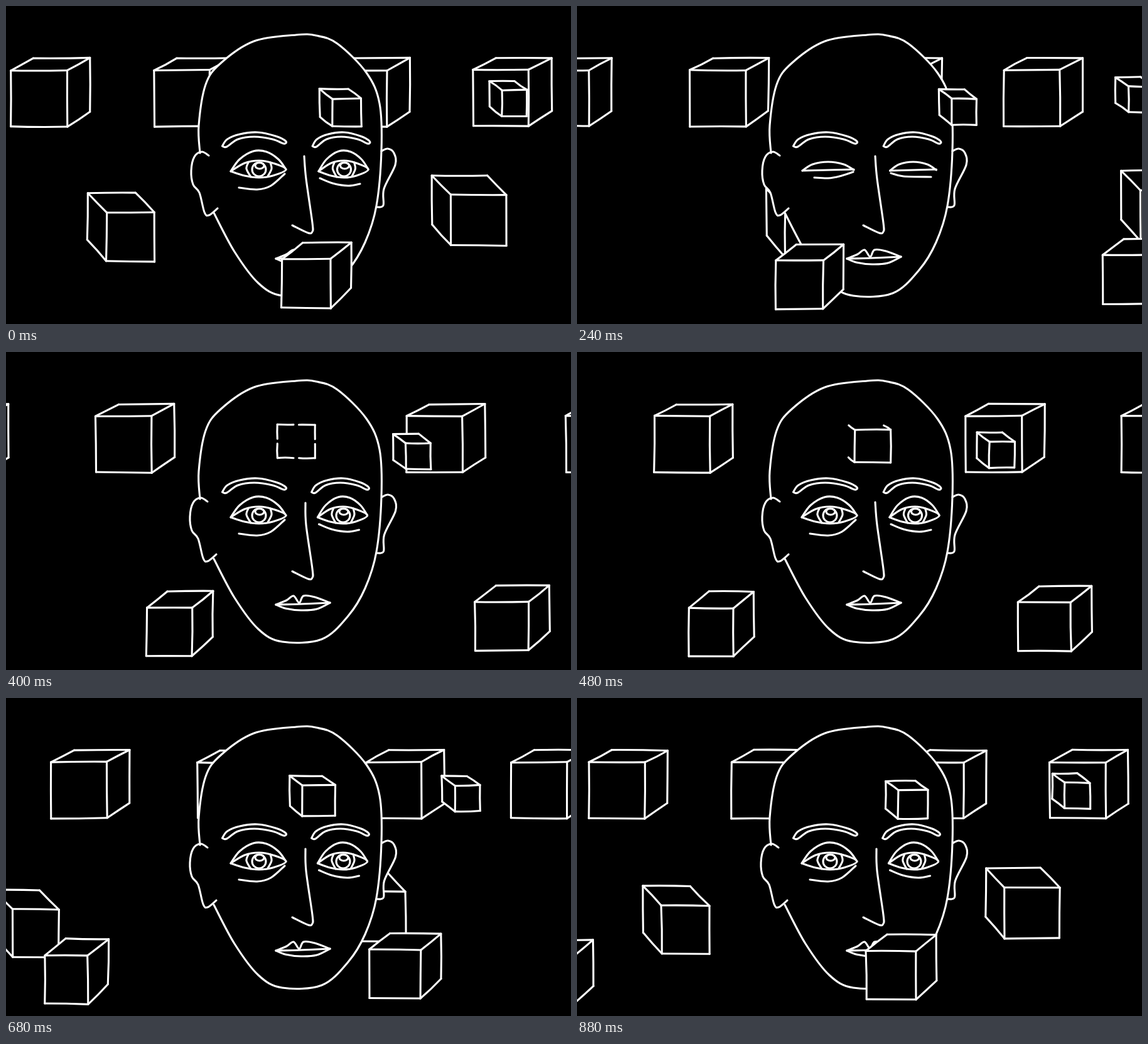
Recreate the animation shown at these times as an HTML page with a canvas. Size 900 by 506 pixels, loop 920 ms.

```html
<!DOCTYPE html>
<html lang="en">
<head>
<meta charset="utf-8">
<title>Cubes and head</title>
<style>
  html, body { margin: 0; width: 100%; height: 100%; overflow: hidden; background: #000; }
  canvas { display: block; width: 900px; height: 506px; }
</style>
</head>
<body>
<canvas id="stage" width="900" height="506"></canvas>
<script>
const LOOP = 920, STEP = 40;
const ctx = document.getElementById('stage').getContext('2d');
const clamp = (v, lo = 0, hi = 1) => Math.max(lo, Math.min(hi, v));

// A row follows one cube from entry to exit over several loops:
// path holds time, x pairs; shape gives the rest of the cube at a time.
const TOP = {
  path: [[280, 928], [400, 892], [760, 780], [920, 744], [1320, 638], [1840, 518], [2080, 456],
    [2600, 278], [2760, 236], [3160, 143], [3520, 52], [3680, 8], [4200, -160]],
  shape: () => ({ y: 102, w: 89, h: 89.5, dx: 36, dy: -19, low: -24 })
};
const MIDDLE = {
  path: [[480, -112], [760, 59], [920, 160], [1160, 332], [1480, 480], [1680, 599], [1840, 709], [2160, 960]],
  shape: t => ({ y: 340 - (t - 560) / 32, w: 72 + (t - 560) / 80, h: 76 + (t - 560) / 250, dx: -30, dy: -31, low: -34 })
};
const BOTTOM = {
  path: [[120, 905], [560, 657], [760, 526], [920, 439], [1040, 368], [1160, 317], [1680, 15], [1920, -160]],
  shape: t => ({ y: 394 + t / 105, w: 88 - (t - 240) / 70, h: 77.5, dx: 33, dy: -26, low: -31 })
};
// Starts as a square on the forehead, then grows depth and drifts off.
const SMALL = {
  path: [[280, 433], [400, 433], [560, 451], [760, 486], [920, 520], [1040, 565], [1160, 597],
    [1480, 677], [1840, 790], [2200, 922]],
  shape: t => {
    const depth = clamp((t - 400) / 160);
    const drop = 32 * (1 - clamp((t - 400) / 600)) ** 2;
    return {
      y: 148 - drop - Math.max(0, t - 1200) / 45,
      w: clamp(59 - (t - 400) / 40, 40, 59),
      h: clamp(53 - (t - 400) / 60, 41, 53),
      dx: -20 * depth, dy: -15 * depth, low: -15 * depth,
      front: (t - 280) / 280, back: (t - 560) / 160
    };
  }
};

function xAt(path, time) {
  const i = path.findIndex(key => key[0] > time);
  if (i < 1) return null;
  const [t0, x0] = path[i - 1], [t1, x1] = path[i];
  return x0 + (x1 - x0) * (time - t0) / (t1 - t0);
}

function wobble(seed, size = 0.8) {
  const v = Math.sin(seed * 127.1 + 3.7) * 43758.5453;
  return ((v - Math.floor(v)) * 2 - 1) * size;
}

function line(a, b, seed) {
  ctx.beginPath();
  ctx.moveTo(a[0], a[1]);
  ctx.quadraticCurveTo((a[0] + b[0]) / 2 + wobble(seed, 1.2), (a[1] + b[1]) / 2 + wobble(seed + 1, 1.2), b[0], b[1]);
  ctx.stroke();
}

// Draws an edge inward from both ends; a part of 0.5 closes it.
function edge(a, b, part, seed) {
  if (part <= 0) return;
  if (part >= 0.5) return line(a, b, seed);
  const mix = k => [a[0] + (b[0] - a[0]) * k, a[1] + (b[1] - a[1]) * k];
  line(a, mix(part), seed);
  line(mix(1 - part), b, seed + 2);
}

function cube(x, { y, w, h, dx, dy, low, front = 1, back = 1 }, seed) {
  const jig = (px, py, n) => [px + wobble(seed + n), py + wobble(seed + n + 0.5)];
  const f = [jig(x, y, 1), jig(x + w, y, 2), jig(x + w, y + h, 3), jig(x, y + h, 4)];
  const b = [jig(x + dx, y + dy, 5), jig(x + w + dx, y + dy, 6),
    jig(x + w + dx, y + h + low, 7), jig(x + dx, y + h + low, 8)];
  const [i, j, k, rest] = dx > 0 ? [0, 1, 2, 3] : [1, 0, 3, 2];
  if (back >= 0.5) {
    ctx.beginPath();
    [f[rest], f[i], b[i], b[j], b[k], f[k]].forEach(p => ctx.lineTo(p[0], p[1]));
    ctx.fill();
  }
  for (let n = 0; n < 4; n++) edge(f[n], f[(n + 1) % 4], front, seed + 10 + n * 3);
  if (!dx) return;
  [i, j, k].forEach(n => line(f[n], b[n], seed + 30 + n));
  edge(b[i], b[j], back, seed + 40);
  edge(b[j], b[k], back, seed + 44);
}

function row({ path, shape }, t) {
  const end = path[path.length - 1][0];
  for (let time = t; time < end; time += LOOP) {
    const x = xAt(path, time);
    if (x !== null) cube(x, shape(time), time / STEP * 7.3 + path.length);
  }
}

// Smooth curve through flat x, y pairs, moved and scaled along x.
function curve(pts, ox = 0, sx = 1, fill = false) {
  const n = pts.length / 2;
  const p = i => {
    const c = clamp(i, 0, n - 1);
    return [pts[c * 2] * sx + ox, pts[c * 2 + 1]];
  };
  ctx.beginPath();
  ctx.moveTo(...p(0));
  for (let i = 0; i < n - 1; i++) {
    const [a, b, c, d] = [p(i - 1), p(i), p(i + 1), p(i + 2)];
    ctx.bezierCurveTo(b[0] + (c[0] - a[0]) / 6, b[1] + (c[1] - a[1]) / 6,
      c[0] - (d[0] - b[0]) / 6, c[1] - (d[1] - b[1]) / 6, c[0], c[1]);
  }
  if (fill) ctx.fill();
  else ctx.stroke();
}

function ring(x, y, rx, ry = rx) {
  ctx.beginPath();
  ctx.ellipse(x, y, rx, ry, 0, 0, Math.PI * 2);
  ctx.stroke();
}

const SKULL = [
  309, 234, 307, 190, 318, 125, 342, 91, 395, 56, 462, 46, 494, 47, 528, 60, 574, 106, 595, 155,
  598, 230, 590, 318, 572, 376, 545, 420, 503, 457, 440, 461, 402, 441, 364, 391, 331, 329
];
const LEFT_EAR = [323, 238, 312, 232, 300, 240, 295, 262, 298, 284, 308, 297, 316, 328, 323, 333, 337, 322];
const RIGHT_EAR = [598, 231, 608, 227, 618, 234, 620, 253, 602, 291, 601, 317, 591, 320];

function eye(x, sx, closed) {
  if (closed) {
    curve([-41, 262, -25, 252, 0, 248, 25, 252, 41, 261], x - 2, sx);
    curve([-41, 262, 41, 260], x - 2, sx);
    return;
  }
  curve([-44, 263, -30, 244, -8, 231, 13, 232, 32, 244, 44, 260], x, sx);
  curve([-44, 263, -22, 250, 1, 246, 23, 250, 44, 260, 23, 270, 1, 273, -22, 270, -44, 263], x, sx);
  curve([-16, 249, -19, 259, -12, 272], x, sx);
  curve([19, 249, 21, 259, 15, 271], x, sx);
  ring(x + 1, 260, 11);
  ring(x + 2, 254, 7, 5);
}

function head(t) {
  // Two drawings of the face take turns.
  const alt = Math.floor(t / 120) % 2;
  const closed = t >= 240 && t < 360;
  const shift = -1.5 * alt;
  for (const fill of [true, false]) {
    curve(SKULL, 0, 1, fill);
    curve(LEFT_EAR, -2 * alt, 1, fill);
    curve(RIGHT_EAR, alt / 2, 1, fill);
  }

  for (const [x, sx] of [[395.5, 1], [534 + shift, 0.9]]) {
    curve([-51, 223, -43, 212, -23, 204, 5, 201, 34, 207, 50, 215, 47, 219, 29, 212, 0, 208, -26, 212, -44, 224, -51, 223], x, sx);
  }
  eye(402, 1, closed);
  eye(537.5 + shift, 0.9, closed);
  curve(closed ? [378, 273, 400, 274, 418, 271, 440, 264] : [371, 289, 400, 292, 422, 286, 444, 267]);
  curve(closed ? [500, 266, 520, 271, 564, 272] : [500, 274, 520, 282, 545, 286, 564, 283], shift);

  curve([475 + alt * 2, 239 + alt, 478, 275, 488, 345, 488, 359, 481, 361, 456, 349]);
  curve([430, 402, 447, 395, 458, 388, 467, 399, 474, 388, 492, 390, 516, 399]);
  curve([430, 402, 470, 401, 516, 399]);
  curve([430, 402, 445, 408, 470, 411, 495, 409, 516, 399]);
}

function draw(t) {
  ctx.fillStyle = '#000';
  ctx.fillRect(0, 0, 900, 506);
  ctx.strokeStyle = '#fff';
  ctx.lineWidth = 3.1;
  ctx.lineCap = ctx.lineJoin = 'round';
  row(TOP, t);
  row(MIDDLE, t);
  head(t);
  row(SMALL, t);
  row(BOTTOM, t);
}

let shown = -1;
function tick() {
  const t = Math.floor(performance.now() % LOOP / STEP) * STEP;
  if (t !== shown) draw(shown = t);
  requestAnimationFrame(tick);
}
tick();
</script>
</body>
</html>
```
